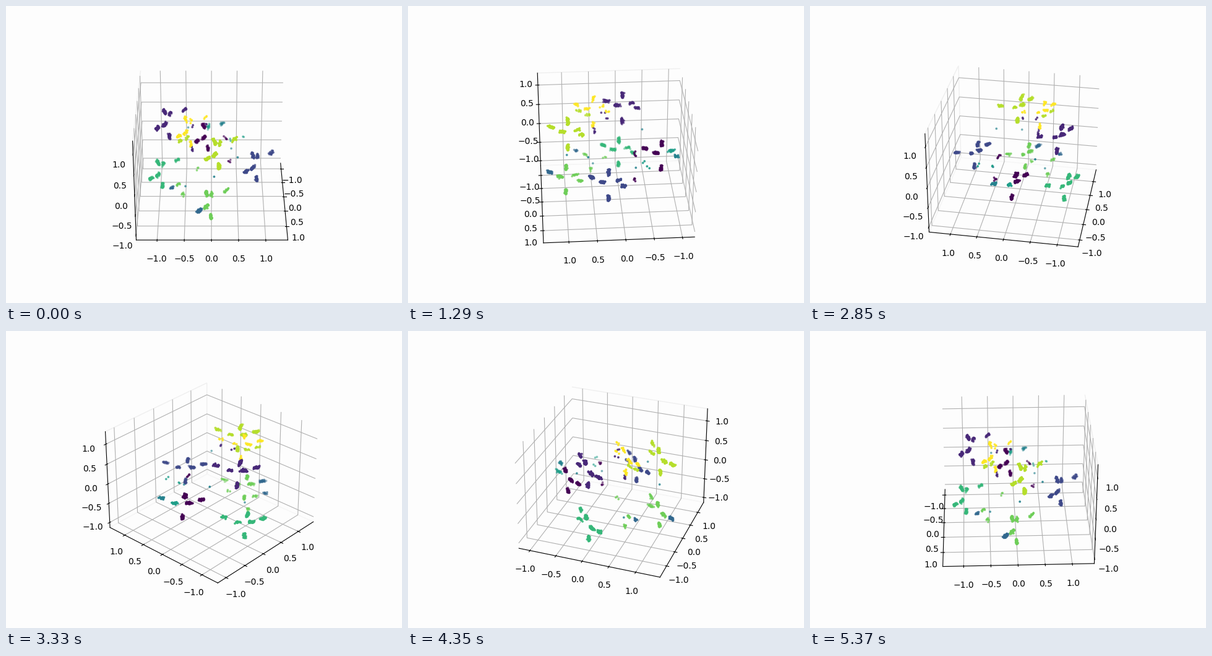
A matplotlib script that plays this animation: 640x480 px, repeating every 5.4 s.

```python
import numpy as np
import matplotlib.pyplot as plt
from matplotlib.animation import FuncAnimation

FRAMES, INTERVAL = 180, 30
PAPER = "#fdfdfd"
rng = np.random.default_rng(4)

# Axis limits, and the size of the drawn box that they span
LOW = np.array([-1.215, -1.384, -1.135])
HIGH = np.array([1.445, 1.406, 1.306])
BOX = np.array([1.1905, 1.1905, 0.8929])

# Six clumps that every group repeats, and how full each one is
MOTIF = np.array([(-.006, -.034, .216), (-.077, .006, .163),
                  (-.110, .121, .178), (.126, -.089, .142),
                  (.042, -.034, .127), (0, 0, 0)])
FILL = (1, .4, .4, 1, 1, 1)
MIDDLE = MOTIF.mean(axis=0)

# Anchor, label of each clump ("-" for none), points per full clump
RING = [
    ((-.091, -.346, .106), "111111", 45),
    ((-.390, -.036, -.181), "054000", 45),
    ((.070, .362, -.200), "222222", 45),
    ((.376, .053, .096), "888888", 45),
    ((.397, -.010, -.360), "777377", 36),
    ((-.066, -.409, -.350), "666666", 45),
]
SPARSE = [
    ((.160, -.170, .174), "999999", 12),
    ((.180, -.235, -.290), "--7377", 8),
    ((-.155, .148, -.169), "055--0", 5),
    ((.151, -.158, .125), "-11881", 7),
]


def clump(centre, stroke, n):
    t = rng.uniform(-1, 1, (n, 1))
    return centre + t * stroke + rng.normal(0, .005, (n, 3))


def build():
    pts, labels = [], []
    for anchor, codes, full in RING + SPARSE:
        for offset, code, fill in zip(MOTIF, codes, FILL):
            if code == "-":
                continue
            # each clump is a short stroke pointing away from the group's middle
            ray = offset - MIDDLE
            n = int(full * fill)
            pts.append(clump(anchor + offset, .022 * ray / np.linalg.norm(ray), n))
            labels += [int(code)] * n

    # lone points halfway between neighbouring groups
    centres = np.array([g[0] for g in RING]) + MIDDLE
    pts.append((centres[:-1] + centres[1:]) / 2)
    labels += [4] * (len(RING) - 1)

    return np.vstack(pts) * (HIGH - LOW) / BOX + (HIGH + LOW) / 2, labels


fig = plt.figure(figsize=(6.4, 4.8), dpi=100, facecolor=PAPER)
ax = fig.add_subplot(projection="3d", facecolor=PAPER)

data, labels = build()
ax.scatter(*data.T, c=labels, cmap="viridis", vmin=0, vmax=9, s=3)

ax.set(xlim=(LOW[0], HIGH[0]), ylim=(LOW[1], HIGH[1]), zlim=(LOW[2], HIGH[2]))
for axis, edge in zip((ax.xaxis, ax.yaxis, ax.zaxis), (PAPER, "#efefef", "#f6f6f6")):
    axis.set_ticks(np.arange(-1, 1.1, .5))
    axis.pane.set(facecolor=PAPER, edgecolor=edge, alpha=1)


def update(i):
    # the tiny minimum keeps the side pane on the left when seen head-on
    ax.view_init(elev=30, azim=max(360 * i / FRAMES, 1e-4))
    return []


anim = FuncAnimation(fig, update, frames=FRAMES, interval=INTERVAL,
                     repeat=True, repeat_delay=0, blit=False)
plt.show()
```
